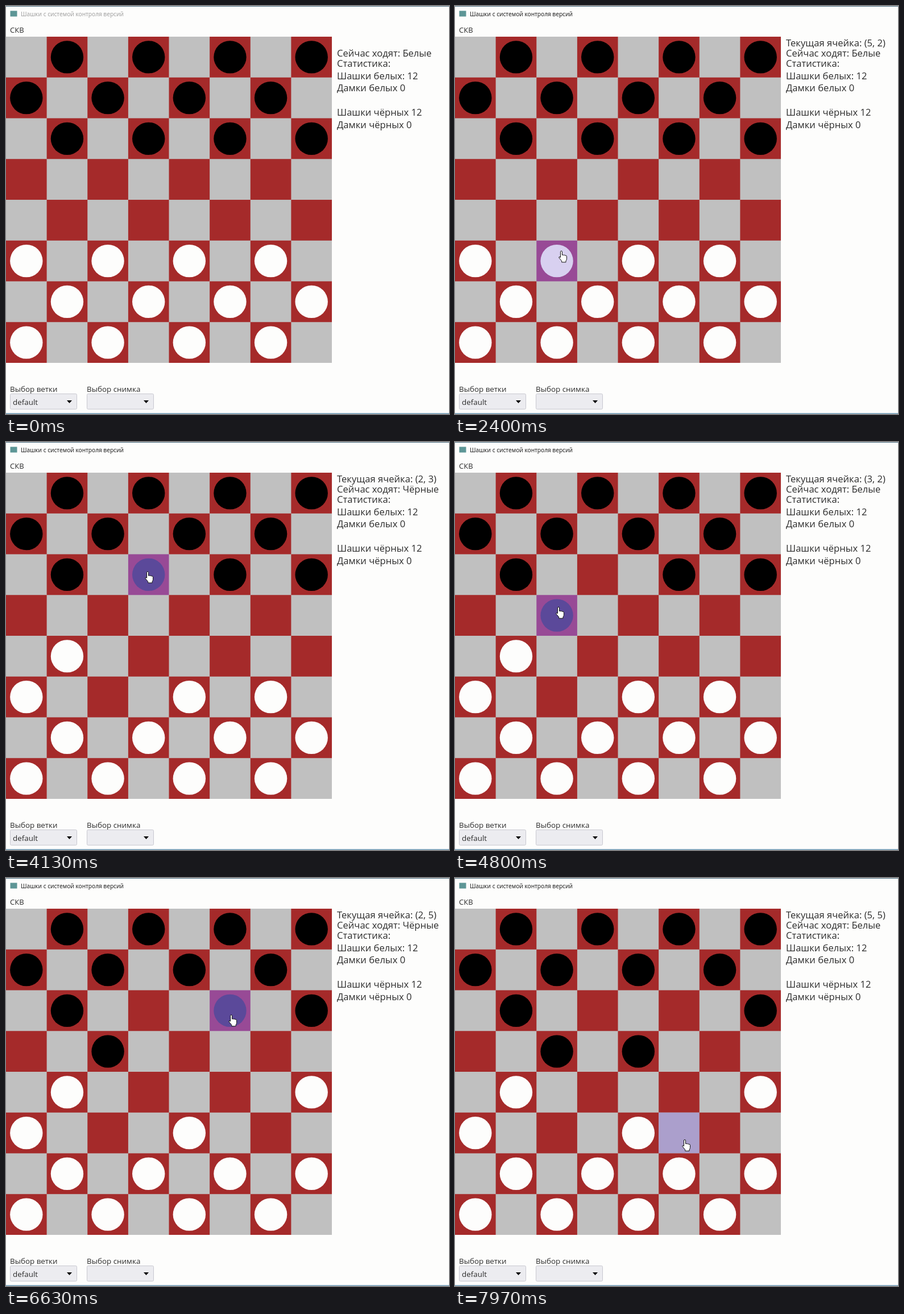
An HTML page for the animation above (8000 ms loop, 779 by 718 pixels).

```html
<!DOCTYPE html>
<html lang="ru">
<head>
<meta charset="utf-8">
<title>Шашки</title>
<style>
  html, body { margin: 0; width: 100%; height: 100%; overflow: hidden; background: #fdfdfc; }
  svg { display: block; width: 779px; height: 718px; font-family: "Open Sans", "Noto Sans", sans-serif; }
  text { fill: #2c2c2c; white-space: pre; }
  .stats { font-size: 16.6px; }
  .label { font-size: 13.4px; }
</style>
</head>
<body>
<svg viewBox="0 0 779 718">
  <rect width="779" height="718" fill="#fdfdfc"/>
  <rect width="779" height="1" fill="#47697d"/>
  <rect y="716.5" width="779" height="1.5" fill="#6f9ab5"/>
  <rect x="7.5" y="8.5" width="12" height="10" fill="#5d9696"/>
  <text id="title" x="26" y="18" font-size="10.2">Шашки с системой контроля версий</text>
  <text x="7" y="47" font-size="13">СКВ</text>
  <g id="board"></g>
  <g id="stats" class="stats"></g>
  <g id="menus" class="label"></g>
  <path id="hand" fill="#fff" stroke="#111" stroke-linejoin="round"
    d="M-1.5 11V1.2a1.5 1.5 0 0 1 3 0V7q1.4-1.3 2.800.2 1.500-1 2.700.5 2.300-.6 2.500 1.700v4.100q0 2-1.500 3.700V19.500H.7v-2.200L-4 11.700q-.6-1.700 1-1.700z"/>
</svg>
<script>
const NS = "http://www.w3.org/2000/svg";
const LOOP = 8000, N = 8, W = 71.63, H = 71.75, TOP = 54;
const LAG = 35;       // the hover follows the pointer one tick late
const REST = 100;     // pause around each click
const DRAG = 430;     // from picking a piece to placing it
const SETTLE = 80;    // both squares stay marked after placing
const ACTIVE = 1950;  // the window gets focus

const colors = {
  dark:  { plain: "#a52a2a", lit: "#984a96" },
  light: { plain: "none", lit: "#ab9fcc" },
  white: { plain: "#fdfdfc", lit: "#d8d0f0" },
  black: { plain: "#000", lit: "#5b499a" }
};

// Click points as fractional [row, column]
const moves = [
  { pick: 3080, from: [5.26, 2.61], to: [4.59, 1.86] },
  { pick: 4270, from: [2.4, 3.5], to: [3.3, 2.54] },
  { pick: 5650, from: [5.4, 6.5], to: [4.6, 7.5] },
  { pick: 6720, from: [2.61, 5.53], to: [3.5, 4.5] }
];
moves.forEach((m, i) => {
  m.drop = m.pick + DRAG;
  m.end = m.drop + SETTLE;
  m.side = i % 2 ? "black" : "white";
});

const rest = (t, at) => [{ t: t - REST, at }, { t: t + REST, at }];
const stops = [
  { t: 840, at: [9.31, 2.19] },
  { t: 1100, at: [4.27, 2.61] },
  { t: 1400, at: [4.6, 1.6] },
  { t: 2300, at: moves[0].from },
  ...moves.flatMap(m => [...rest(m.pick, m.from), ...rest(m.drop, m.to)]),
  { t: 7930, at: [5.67, 5.64] },
  { t: LOOP, at: [5.67, 5.64] }
];

const $ = id => document.getElementById(id);

function add(parent, tag, attrs, text = "") {
  const el = document.createElementNS(NS, tag);
  for (const k in attrs) el.setAttribute(k, attrs[k]);
  el.textContent = text;
  return parent.appendChild(el);
}

add($("board"), "rect", { y: TOP, width: N * W, height: N * H, fill: "#c0c0c0" });
const cells = Array.from({ length: N * N }, (_, i) => {
  const r = Math.floor(i / N), c = i % N, x = c * W, y = TOP + r * H;
  return {
    r, c,
    tone: (r + c) % 2 ? "dark" : "light",
    rect: add($("board"), "rect", { x, y, width: W, height: H }),
    disc: add($("board"), "circle", { cx: x + W / 2, cy: y + H / 2, r: 28.7 })
  };
});

const [cellLine, turnLine] = [71, 89].map(y => add($("stats"), "text", { x: 582, y }));
["Статистика:", "Шашки белых: 12", "Дамки белых 0", "", "Шашки чёрных 12", "Дамки чёрных 0"]
  .forEach((s, i) => add($("stats"), "text", { x: 582, y: 107 + 21.6 * i }, s));

[["Выбор ветки", "default"], ["Выбор снимка", ""]].forEach(([label, value], i) => {
  const g = add($("menus"), "g", { transform: `translate(${7 + 135 * i} 682)` });
  add(g, "text", { y: -3 }, label);
  add(g, "rect", { x: 0.5, y: 0.5, width: 117, height: 27, rx: 2, fill: "#ececf0", stroke: "#c8c8d0" });
  add(g, "path", { d: "M100 12h9l-4.5 5z" });
  add(g, "text", { x: 5, y: 20 }, value);
});

function pointer(t) {
  const i = stops.findIndex(s => s.t > t);
  if (i < 1) return null;
  const a = stops[i - 1], b = stops[i];
  const f = (t - a.t) / (b.t - a.t), u = f * f * (3 - 2 * f);
  return a.at.map((v, k) => v + (b.at[k] - v) * u);
}

const inside = (p, r, c) => !!p && Math.floor(p[0]) === r && Math.floor(p[1]) === c;

function pieceAt(r, c, t) {
  let piece = (r + c) % 2 === 0 ? null : r < 3 ? "black" : r > 4 ? "white" : null;
  for (const m of moves) {
    if (t >= m.drop && inside(m.to, r, c)) piece = m.side;
    if (t >= m.end && inside(m.from, r, c)) piece = null;
  }
  return piece;
}

function isTarget(move, r, c) {
  return !!move && r === Math.floor(move.to[0]) && Math.abs(c - Math.floor(move.from[1])) === 1;
}

function render(t) {
  const hover = pointer(t - LAG);
  const move = moves.find(m => t >= m.pick && t < m.end);
  const done = moves.filter(m => t >= m.end).length;
  let current = "";

  for (const { r, c, tone, rect, disc } of cells) {
    const over = inside(hover, r, c);
    const target = isTarget(move, r, c);
    const lit = !target && (over || (move && inside(move.from, r, c)));
    const shade = lit ? "lit" : "plain";
    const piece = pieceAt(r, c, t);
    rect.setAttribute("fill", target ? "#0f0" : colors[tone][shade]);
    disc.setAttribute("fill", piece ? colors[piece][shade] : "none");
    if (over) current = `Текущая ячейка: (${r}, ${c})`;
  }

  cellLine.textContent = current;
  turnLine.textContent = "Сейчас ходят: " + (done % 2 ? "Чёрные" : "Белые");
  $("title").style.fill = t < ACTIVE ? "#999" : "#111";

  const p = pointer(t);
  $("hand").style.display = p ? "" : "none";
  if (p) $("hand").setAttribute("transform", `translate(${p[1] * W} ${TOP + p[0] * H})`);
}

const start = performance.now();
function tick() {
  render((performance.now() - start) % LOOP);
  requestAnimationFrame(tick);
}
tick();
</script>
</body>
</html>
```
